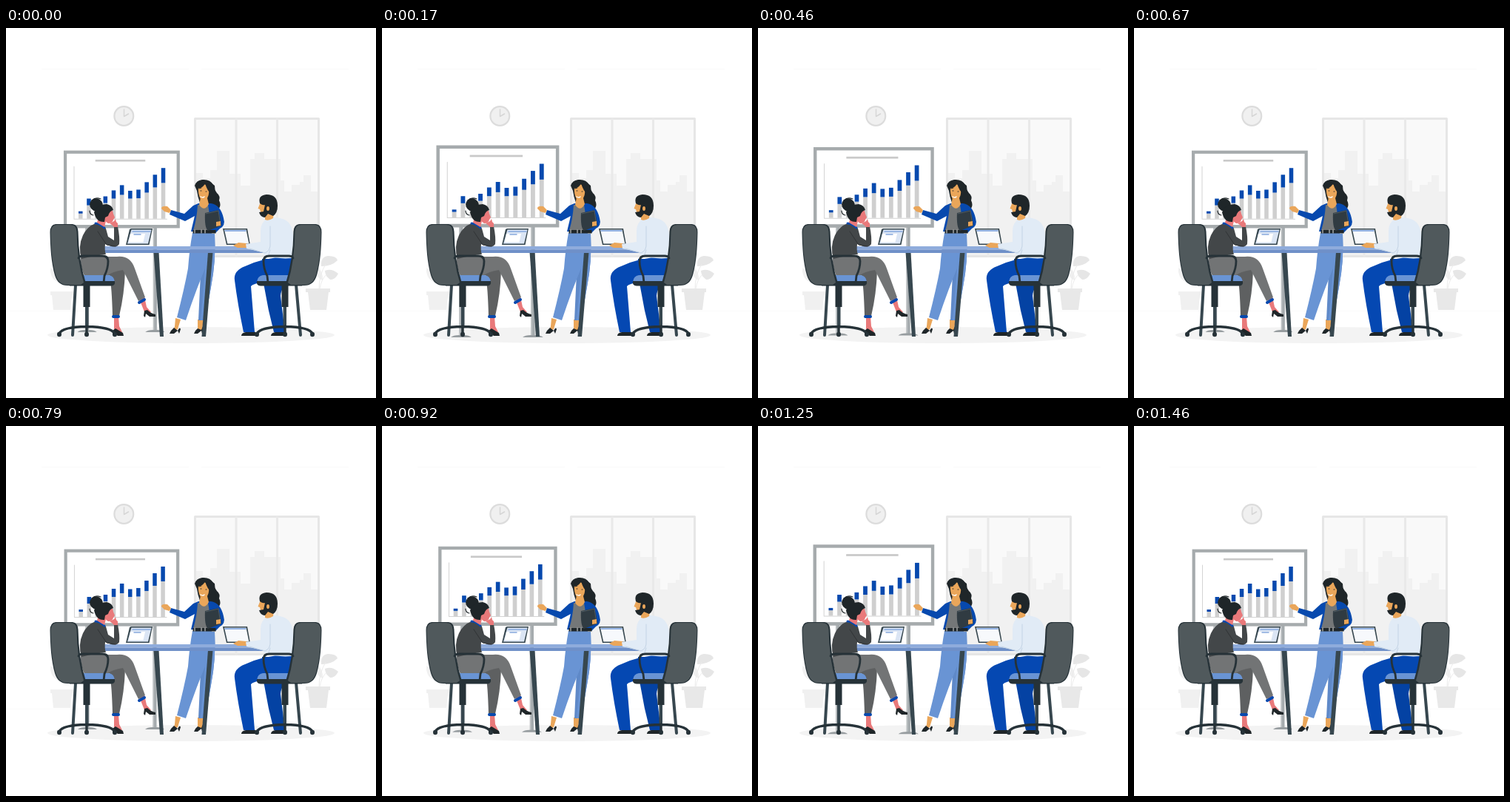
These frames come from a looping animation (500x500 px, 1.5 s). An HTML page with a canvas:

```html
<!DOCTYPE html>
<html lang="en">
<head>
<meta charset="utf-8">
<title>Team presentation</title>
<style>
  html, body { margin: 0; width: 100%; height: 100%; overflow: hidden; background: #fff; }
  canvas { display: block; width: 500px; height: 500px; }
</style>
</head>
<body>
<canvas id="stage" width="500" height="500"></canvas>
<script>
const ctx = document.getElementById('stage').getContext('2d');
const LOOP = 1500;
const BLUE = '#0749ae', DENIM = '#6994d4', INK = '#263238', SLATE = '#37474f';
const BLACK = '#1f2629', TAN = '#eaa65a', PINK = '#e9797a';

const fill = (color, d) => { ctx.fillStyle = color; ctx.fill(new Path2D(d)); };
const line = (color, width, d) => {
  ctx.strokeStyle = color;
  ctx.lineWidth = width;
  ctx.stroke(new Path2D(d));
};
const rect = (color, x, y, w, h) => { ctx.fillStyle = color; ctx.fillRect(x, y, w, h); };
const oval = (color, x, y, rx, ry = rx, turn = 0) => {
  ctx.fillStyle = color;
  ctx.beginPath();
  ctx.ellipse(x, y, rx, ry, turn, 0, Math.PI * 2);
  ctx.fill();
};
const mirrored = (axis, draw) => {
  ctx.save();
  ctx.translate(axis * 2, 0);
  ctx.scale(-1, 1);
  draw();
  ctx.restore();
};

// Two beats of the board: [time, scale, slope per ms]
const BEATS = [
  [-40, 1, 0], [0, 1.008, .0003], [170, 1.066, .00036], [272, 1.094, 0],
  [460, 1.046, -.00024], [670, 1.008, -.00012], [770, 1, 0],
  [920, 1.031, .00036], [1085, 1.089, 0], [1460, 1, 0], [1500, 1.008, .0003]
];

function boardScale(t) {
  const i = BEATS.findIndex(b => b[0] > t);
  const [t0, a, va] = BEATS[i - 1], [t1, b, vb] = BEATS[i];
  const span = t1 - t0, u = (t - t0) / span, v = 1 - u;
  return a * v * v * (1 + 2 * u) + b * u * u * (3 - 2 * u)
    + span * u * v * (va * v - vb * u);
}

function drawRoom() {
  rect('#fafafa', 48, 55, 199, 1);
  rect('#fafafa', 264, 55, 199, 1);
  rect('#fafafa', 0, 382, 500, 1);

  rect('#f9f9f9', 255, 122, 168, 187);
  fill('#f1f1f1', 'M256 308V196H266V203H276V192H285V166H302V197H317V213H330V177H336V169H349V177H371V206H376V221H386V212H397V208H402V199H412V221H422V308Z');
  ctx.strokeStyle = '#e6e6e6';
  ctx.lineWidth = 3;
  ctx.strokeRect(255.5, 122.5, 167, 186);
  line('#e9e9e9', 3, 'M311 123V308M366.5 123V308');

  oval('#dcdcdc', 159.3, 119, 14);
  oval('#f0f0f0', 159.3, 119, 11.8);
  line('#d6d6d6', 1.5, 'M159.5 110V119.5L165.5 116');

  fill('#e6e6e6', 'M426 322Q425 309 435 308Q447 308 448 314Q440 322 426 322Z');
  fill('#e6e6e6', 'M431 328Q440 324 449 332Q444 341 438 340Q431 335 431 328Z');
  fill('#f0f0f0', 'M420 322Q429 329 428 341Q418 338 420 322Z');
  line('#ececec', 1, 'M423 352Q423 334 432 319M424 352Q426 340 433 333');
  fill('#e8e8e8', 'M405 352H438V357H436L433 381H411L408 357H405Z');
  fill('#f0f0f0', 'M60 356H91V361H89L87 381H64L62 361H60Z');
  fill('#f1f1f1', 'M60 324Q70 329 72 344Q59 340 60 324Z');
  oval('#f3f3f3', 250, 415, 194, 11);
}

function drawBoard(scale) {
  ctx.save();
  ctx.translate(156.4, 288);
  ctx.scale(scale, scale);
  ctx.translate(-156.4, -288);

  for (const x of [110, 201]) {
    rect('#a5abae', x - 2.5, 268, 5, 140);
    rect('#bfc3c5', x - 2.5, 268, 1.5, 140);
    fill('#979da0', `M${x - 13} 410Q${x - 10} 407 ${x - 3} 407H${x + 3}Q${x + 10} 407 ${x + 13} 410Z`);
  }
  rect('#a6abad', 78.6, 166.6, 155.6, 104);
  rect('#fff', 82.8, 170.8, 147.2, 95.4);
  rect('#c9c9c9', 121, 178.8, 67, 2.6);
  line('#d4d4d4', 1, 'M92.5 188V258.5H217');

  const tops = [248, 231, 234, 228, 220, 213, 220.5, 219, 209, 199, 190];
  const splits = [251, 240, 241, 237, 231, 226, 231, 230.5, 223, 216, 210];
  tops.forEach((top, i) => {
    const x = 98.5 + i * 11.08;
    rect('#cfcfcf', x, splits[i], 5.5, 258 - splits[i]);
    rect(BLUE, x, top, 5.5, splits[i] - top);
  });
  ctx.restore();
}

function drawPresenter() {
  fill(BLACK, 'M255 213Q257 206 265 205Q276 204 280 212Q281 218 285 223Q290 227 288 233Q291 239 288 244Q283 249 274 243L262 236Q259 228 258 220Z');
  fill(TAN, 'M229 392L236 394L232 407L226 410L228 403ZM259 394H267L265 408H259Z');
  fill(BLACK, 'M221 413Q223 408 227 405L232 409Q235 403 236 407L234 413L232 409L227 413ZM254 413Q256 408 259 406L264 408L266 403L267 412L265 413L264 409L259 413Z');
  fill('#5f89c8', 'M262 278H282Q284 315 277 350L269 395H260L264 310Z');
  fill(DENIM, 'M252 277H278Q279 300 272 318Q258 350 243 395L231 391Q241 352 246 325Q248 298 252 277Z');
  fill(DENIM, 'M268 278H282Q284 315 277 350L269 395H263L269 325Z');
  fill(BLUE, 'M253 240L260 237H277Q290 239 294 257Q297 267 289 271L283 277L250 275L255 254L242 261L221 252L223 246L241 251Z');
  fill('#747778', 'M259 239H273Q276 254 275 274H253Q258 257 259 239Z');
  fill(TAN, 'M263 229L272 230L274 238Q268 249 261 239Z');
  fill(TAN, 'M260 214Q266 209 273 213Q276 223 272 230Q268 235 263 231Q259 225 260 214Z');
  fill(BLACK, 'M258 217Q266 217 269 210Q272 220 277 224L274 234L284 236L282 213Q269 201 260 210Z');
  line(BLACK, .9, 'M263 220H264M270 221H271M261 217L264 216');
  line('#fff', 1.4, 'M263 228Q266 230 268 228');
  rect(BLACK, 252.5, 273, 31, 4.5);
  line('#e3e3e3', 1, 'M255 273V277M264 273V277M269 273V277');
  fill('#303b42', 'M269 250L287 246Q290 256 291 267L273 274Q268 270 269 250Z');
  line('#56636a', .8, 'M270 251L287 247L290 267');
  fill(TAN, 'M284 262L290 261L290 267L284 268ZM223 246L218 241Q210 240 210 244L214 248L221 250Z');
}

function drawLaptops() {
  fill(SLATE, 'M169 271H198L193.5 293H162L167 272Z');
  fill('#dbe5f4', 'M169.5 272.5H196.5L192 291.5H164Z');
  fill('#fff', 'M168 278H188L185.5 289.5H166Z');
  line('#84a6dc', 1.5, 'M171 275H195M173 279H182');
  fill(SLATE, 'M293 271H326L330 293H298Z');
  fill('#f7f9fc', 'M295 272.5H324.5L328.3 291.5H299.3Z');
  line('#6e96d8', 1.3, 'M296 274H324');
}

function drawTable() {
  line(SLATE, 4, 'M94 347L90 415M392 347L398 415');
  fill(SLATE, 'M199.5 303H206.5L213 417H208Z');
  fill(SLATE, 'M273 303H279.5L270 417H264.5Z');
  rect('#8facdc', 128, 295, 222, 4.5);
  rect('#6f90c8', 128, 299.5, 222, 4.5);
}

function drawChairSeat() {
  rect(INK, 104.5, 348, 9, 29);
  rect(SLATE, 107, 377, 4.5, 27);
  line(INK, 3.4, 'M72 413Q76 404 109 403.5Q142 404 147 413M109 403V413');
  for (const x of [72, 109, 147]) oval(INK, x, 414, 3, 3.2);
  fill(DENIM, 'M100 334H139Q146 335 147 343H103Z');
  fill(INK, 'M80 342H147Q148 348 142 348.5H86Z');
}

function drawChairBack() {
  fill(INK, 'M67 265H90Q97 266 97.5 275Q98 313 108 345L103 348H83Q70 348 66 334C61 316 60 297 59.5 276Q59.5 266 67 265Z');
  fill('#50595c', 'M68 266H87Q95 266 95.5 275Q96 315 105 344L101 347H83Q71 347 67 333C62 315 61 297 60.5 276Q61 267 68 266Z');
  line(INK, 2.8, 'M98 311Q99 308 104 308H130Q138 308 138 315Q138 325 133 335L132 344');
}

function drawListener() {
  fill(PINK, 'M146 389H152L153 403L157 411L146 410ZM180 366L187 363L190 377L196 384L188 386Z');
  fill(BLACK, 'M144 416V409L148 406Q153 409 158 412L159 416H151L146 411ZM186 389L187 382L191 381Q196 386 202 387V390L194 390L189 386L188 391Z');
  fill('#5e6061', 'M105 310H144Q160 313 161 328Q160 360 153 389H144Q143 350 140 334H109Z');
  fill('#727475', 'M101 309H150Q168 307 174 325L188 364L179 369L158 327Q144 329 136 335H106Q100 322 101 309Z');
  line(BLUE, 4, 'M145 390H152M180 371L187 367');
  fill('#434749', 'M121 264Q130 263 135 271L138 282L146 287L146 269L151 268Q154 283 153 292Q150 297 142 295L134 292Q133 301 135 306Q121 307 102 312Q97 295 104 280Q110 268 121 264Z');
  line('#303335', 1, 'M124 275L136 293L148 295');
  line(BLUE, 3, 'M121 264Q127 264 133 270');
  fill(PINK, 'M125 255L136 257L133 269L123 263Z');
  fill(PINK, 'M136 247H144L145 251L147 256L145 259Q144 264 138 264Q132 261 133 251Z');
  fill(PINK, 'M146 269L143 266L140 264L146 261L148 258L149 262L151 264V269Z');
  oval(BLACK, 122, 239, 9, 8.5, .5);
  fill(BLACK, 'M119 249Q123 238 136 238Q143 239 145 246Q140 247 138 254L134 256L133 262Q122 263 119 249Z');
  line(BLACK, 1.2, 'M116 233Q121 228 128 231M113 247Q113 252 118 253');
}

function drawColleague() {
  fill(TAN, 'M327 404H335V412H327ZM365 396H373V410H365Z');
  fill(BLACK, 'M318 416Q318 412 324 411L330 409L337 411V416ZM358 416Q358 412 364 411L372 408L378 411V416Z');
  fill('#0442a3', 'M346 312H386V343Q372 348 371 362L377 411L362 411Q354 381 349 350Q344 330 346 312Z');
  fill('#0548b2', 'M386 310Q353 308 323 322Q307 328 309 341Q313 373 321 411L336 411L331 349Q337 342 380 341Q389 331 386 310Z');
  fill(TAN, 'M325 291L314 290L307 294L313 297L326 297Z');
  fill('#e1ebf6', 'M352 258Q362 254 374 258Q389 263 388 286L386 311Q367 313 348 306L347 303L325 298L324 292L344 289L344 274Q344 264 352 258Z');
  line('#c3d3e5', 1, 'M357 268V290Q358 301 350 304L329 298M357 300L354 309');
  fill(TAN, 'M350 245L362 247L361 257Q355 261 350 259Z');
  fill(TAN, 'M344 235L352 233V252H345L343 245L340.5 244Z');
  fill(BLACK, 'M343 237Q340 226 352 225Q367 225 367 240Q367 250 361 254L354 251L350 256Q344 256 342 249L348 248L350 239Q347 240 343 237Z');
  oval(TAN, 354, 244, 2, 3);
}

function drawScene(t) {
  rect('#fff', 0, 0, 500, 500);
  drawRoom();
  drawBoard(boardScale(t));
  drawPresenter();
  drawLaptops();
  drawTable();
  drawListener();
  drawColleague();
  for (const part of [drawChairSeat, drawChairBack]) {
    part();
    mirrored(243, part);
  }
}

ctx.lineCap = 'round';
ctx.lineJoin = 'round';
const start = performance.now();
function tick() {
  drawScene((performance.now() - start) % LOOP);
  requestAnimationFrame(tick);
}
tick();
</script>
</body>
</html>
```
